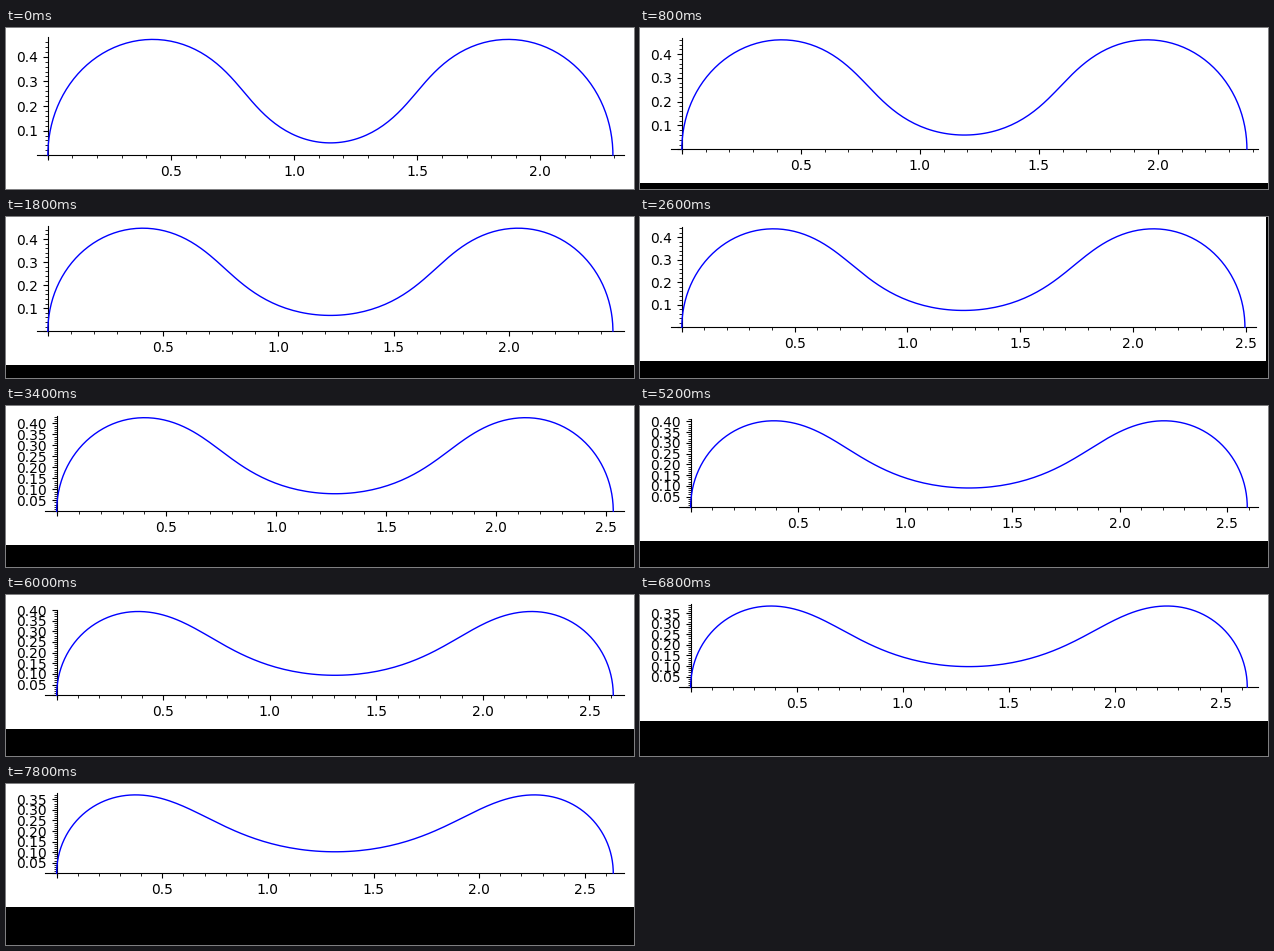
A matplotlib script that plays this animation: 628 px wide and 161 px high, repeating every 8000 ms.

```python
import numpy as np
import matplotlib.pyplot as plt
from matplotlib.animation import FuncAnimation
from matplotlib.patches import Rectangle
from matplotlib.ticker import AutoMinorLocator, FuncFormatter, MultipleLocator

W, H, DPI = 628, 161, 100
FRAMES, INTERVAL = 40, 200
DT, SUBSTEPS, N = 0.001, 40, 240     # flow time per frame, solver steps, cells
C3, C5 = 0.766, -0.091               # dumbbell shape
PAD = 10                             # white margin, px
TICK = 7 * DPI / 72                  # tick length plus label gap, px


def radius(rho, order=0):
    """Radius of the starting surface, or its second derivative (order=2)."""
    total = sum((-1) ** (order // 2) * k ** order * c * np.sin(k * rho)
                for k, c in ((1, 1), (3, C3), (5, C5)))
    return total / (1 + 3 * C3 + 5 * C5)


def profile(v, r0, step):
    """Embed the metric exp(v) * (d rho^2 + r0^2 d theta^2) as a curve."""
    scale = np.exp(v / 2)
    y = np.concatenate(([0], r0 * scale, [0]))
    ds = np.concatenate(([scale[0] / 2], (scale[1:] + scale[:-1]) / 2,
                         [scale[-1] / 2])) * step
    dx = np.sqrt(np.maximum(ds ** 2 - np.diff(y) ** 2, 0))
    return np.concatenate(([0], np.cumsum(dx))), y


def ricci_flow():
    """Profiles of the surface of revolution under Ricci flow, one per frame."""
    step = np.pi / N
    rho = (np.arange(N) + 0.5) * step
    r0 = radius(rho)
    bend = 2 * radius(rho, 2) / r0
    faces = radius(np.arange(1, N) * step)
    v = np.zeros(N)
    flux = np.zeros(N + 1)
    curves = []
    for _ in range(FRAMES):
        curves.append(profile(v, r0, step))
        for _ in range(SUBSTEPS):
            flux[1:-1] = faces * np.diff(v) / step
            v = v + DT / SUBSTEPS * np.exp(-v) * (bend + np.diff(flux) / step / r0)
    return curves


curves = ricci_flow()

fig = plt.figure(figsize=(W / DPI, H / DPI), dpi=DPI, facecolor="black")
page = fig.add_artist(Rectangle((0, 0), W, H, transform=None, color="white",
                                lw=0, zorder=-1))
ax = fig.add_axes([0, 0, 1, 1])
ax.patch.set_visible(False)
for side in ("top", "right"):
    ax.spines[side].set_visible(False)
for side in ("left", "bottom"):
    ax.spines[side].set_position("zero")
ax.tick_params(labelsize=10)
ax.xaxis.set_major_locator(MultipleLocator(0.5))
line, = ax.plot([], [], color="blue", lw=1, zorder=5)


def label_format(digits):
    return FuncFormatter(
        lambda value, _: "" if abs(value) < 1e-9 else f"{value:.{digits}f}")


ax.xaxis.set_major_formatter(label_format(1))


def draw(i):
    x, y = curves[i]
    xmax, ymax = x[-1], y.max()
    coarse = 1.04 * ymax > 0.45
    step = 0.1 if coarse else 0.05

    # Fit the axes between the y labels and a possible overhang of the last x label.
    left = (22.1 if coarse else 30.9) + TICK
    gap = (1.02 * xmax - 0.5 * np.floor(1.02 * xmax / 0.5)) / (1.04 * xmax)
    overhang = max(0, 11 - gap * 496)
    width = 610 - left + 496 * 0.02 / 1.04 - overhang
    scale = width / (1.04 * xmax)
    x0 = PAD + left
    right = x0 + 1.02 * xmax * scale + max(0, 11 - gap * width)

    # The page is as tall as the plot or its top label needs.
    top_tick = step * np.floor(1.02 * ymax / step)
    rise = max(1.02 * ymax * scale, top_tick * scale + 5.5)
    below = PAD + TICK + 14
    page_w = min(W, int(right + PAD))
    page_h = min(H, int(PAD + rise + below))
    page.set_bounds(0, H - page_h, page_w, page_h)

    base = H - page_h + below
    ax.set_position([(x0 - 0.02 * xmax * scale) / W,
                     (base - 0.02 * ymax * scale) / H,
                     width / W, 1.04 * ymax * scale / H])
    ax.set_xlim(-0.02 * xmax, 1.02 * xmax)
    ax.set_ylim(-0.02 * ymax, 1.02 * ymax)
    ax.yaxis.set_major_locator(MultipleLocator(step))
    ax.yaxis.set_major_formatter(label_format(1 if coarse else 2))
    ax.xaxis.set_minor_locator(AutoMinorLocator(5))
    ax.yaxis.set_minor_locator(AutoMinorLocator(5))
    line.set_data(x, y)
    return line, page


anim = FuncAnimation(fig, draw, frames=FRAMES, init_func=lambda: draw(0),
                     interval=INTERVAL, repeat=True, repeat_delay=0, blit=False)
plt.show()
```
